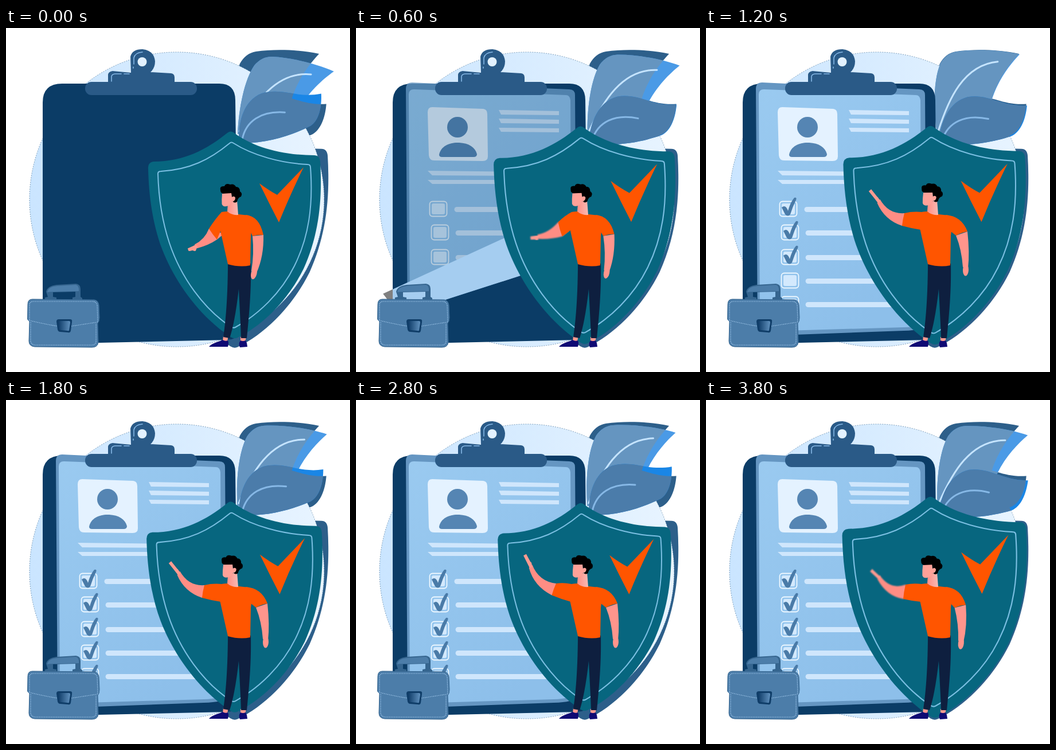
Write an HTML page that moves like this. It is 600x600 px and loops after 4 s.

```html
<!DOCTYPE html>
<html lang="en">
<head>
<meta charset="utf-8">
<title>Insurance form</title>
<style>
  html, body { margin: 0; width: 100%; height: 100%; overflow: hidden; background: #fff; }
  svg { display: block; width: 100%; height: 100%; }
</style>
</head>
<body>
<svg viewBox="0 0 600 600">
  <defs>
    <linearGradient id="sky"><stop offset="0" stop-color="#cae5ff"/><stop offset=".5" stop-color="#d8ecff"/><stop offset="1" stop-color="#e8f4ff"/></linearGradient>
    <linearGradient id="sheet" x2=".6" y2="1"><stop offset="0" stop-color="#9acaf0"/><stop offset="1" stop-color="#8dbfea"/></linearGradient>
    <linearGradient id="lock"><stop offset="0" stop-color="#123f6b"/><stop offset="1" stop-color="#5f90bd"/></linearGradient>
    <linearGradient id="neck"><stop offset="0" stop-color="#ff8f86"/><stop offset="1" stop-color="#fbb9b3"/></linearGradient>
    <circle id="disc" cx="298" cy="299" r="257"/>
    <path id="leafA" d="M403 185C396 140 396 90 408 62Q418 44 436 41C470 36 515 38 546 45C530 62 508 90 497 128C470 160 440 180 403 185Z"/>
    <path id="leafB" d="M406 196C412 165 428 130 462 124C500 121 520 146 564 147C560 170 550 192 533 198C500 206 455 212 406 200Z"/>
    <path id="shieldShape" d="M386 183Q392 178 398 183C430 207 480 222 538 222Q547 222 548 233C552 300 546 360 519 420C490 478 445 520 404 540Q398 543 392 539C340 505 295 445 272 385C255 340 249 290 248 246Q247 234 258 233C310 233 350 212 386 183Z"/>
    <path id="board" d="M64 130Q64 97 98 97H372Q400 97 400 126L405 532Q404 543 385 544L163 549H64Z"/>
    <path id="tick" d="M132 313Q139 307 143 319Q147 304 154 296Q159 295 157 300Q151 312 147 325Q143 330 138 325Z"/>
    <clipPath id="tint"><use href="#disc"/><use href="#leafA"/><use href="#leafB" transform="rotate(-5.5 410 195)"/></clipPath>
    <clipPath id="inBoard"><use href="#board"/></clipPath>
    <clipPath id="inDisc"><use href="#disc"/></clipPath>
    <clipPath id="reveal"><path id="revealShape"/></clipPath>
    <filter id="blur" x="-30%" y="-30%" width="160%" height="160%"><feGaussianBlur id="blurSize" stdDeviation="0"/></filter>
  </defs>

  <!-- shadows behind the disc -->
  <g fill="#2d5f8a">
    <use href="#leafA"/>
    <use href="#leafB" transform="rotate(-5.5 410 195)"/>
    <use href="#shieldShape" transform="translate(398 352) scale(1.087) translate(-398 -352)"/>
  </g>
  <path class="flap" id="flapOut" fill="#808080"/>
  <use href="#disc" fill="url(#sky)"/>
  <use href="#disc" fill="none" stroke="#2d5f8a" stroke-width=".6" stroke-dasharray="2 2"/>
  <path class="flap" id="flapDisc" fill="#fff" clip-path="url(#inDisc)"/>

  <!-- leaves -->
  <use class="upper" href="#leafA" fill="#4a9ae6"/>
  <g clip-path="url(#tint)"><use class="upper" href="#leafA" fill="#6595c0"/></g>
  <path class="upper" d="M405 180C422 125 448 64 508 58" fill="none" stroke="#c5e4ff" stroke-width="3" stroke-linecap="round"/>
  <use class="lower" href="#leafB" fill="#1a86e6"/>
  <g clip-path="url(#tint)"><use class="lower" href="#leafB" fill="#4b7caa"/></g>
  <path class="lower" d="M412 195C425 165 455 153 495 165" fill="none" stroke="#86b8e6" stroke-width="3" stroke-linecap="round"/>

  <!-- clipboard -->
  <use href="#board" fill="#0b3c66"/>
  <g id="doc" clip-path="url(#reveal)">
    <path fill="#6596c2" d="M87 106Q87 95 98 95L140 97L372 107Q382 107 382 117L385 518Q380 527 345 528L100 537Q90 537 90 527Z"/>
    <path fill="url(#sheet)" d="M92 116Q92 107 101 107L366 117Q373 117 374 126L376 512Q376 521 345 522L106 529Q94 530 94 520Z"/>
    <path fill="#e4f2ff" d="M125 147Q125 138 133 138L222 141Q229 142 229 150L230 224Q230 232 221 232L136 231Q128 231 127 222Z"/>
    <g fill="#5585b3"><circle cx="177" cy="173" r="18"/><path d="M145 221C148 205 165 199 180 200C197 201 208 208 211 220Q211 225 205 225H150Q145 225 145 221Z"/></g>
    <path fill="#cfe6fc" d="M249 143L354 145V152L253 151ZM249 158L354 160V167L253 166ZM249 174L354 175V182L253 181ZM125 249L300 251V258L133 257ZM125 265H300V272H133Z"/>
    <g id="rows"></g>
  </g>
  <path class="flap" id="flapBoard" clip-path="url(#inBoard)"/>
  <g fill="#2a5a87">
    <path d="M178 96V81Q179 76 186 75L218 78L217 50Q220 37 238 37Q258 39 260 58Q260 70 252 77L288 79Q294 80 294 86V96Z"/>
    <rect x="138" y="94" width="195" height="23" rx="11"/>
    <circle cx="237.500" cy="59" r="8" fill="#e2f1ff"/>
    <path d="M223 63V52Q225 43 238 42M184 93V85Q184 81 190 80H201M206 80H215M222 68V70" fill="none" stroke="#86b8e6" stroke-width="1.600" stroke-linecap="round"/>
  </g>

  <!-- briefcase -->
  <path fill="#35658f" d="M68 474V470L73 469L70 460Q72 450 88 448L122 446Q130 447 130 455V469L133 471V475H116V470L121 469V460L82 461V469L88 470V474Z"/>
  <path fill="#4c7da9" d="M72 461Q74 451 89 450L121 448Q126 448 127 455V459L84 460Q76 460 72 461Z"/>
  <path fill="#4c7da9" stroke="#35658f" d="M38 482Q38 473 46 473L154 474Q161 475 162 483L163 505Q163 512 160 515L161 548Q160 557 150 557L50 556Q40 555 40 546L41 512L37.500 508Z"/>
  <path d="M41 509V482Q42 477 48 477H152Q158 478 159 484L160 512M43 513V546Q44 553 52 553H149Q157 553 157 546V516M40 510Q75 518 90 520M114 520L160 513" fill="none" stroke="#a4cbee" stroke-width="1.100" stroke-dasharray="1.500 1.500"/>
  <path fill="#0f3d68" d="M88 512Q88 508 92 508H112Q116 508 115 513L113 528Q112 532 108 531L95 530Q91 530 90 526Z"/>
  <path fill="url(#lock)" d="M92 513Q92 511 95 511H110Q112 511 112 514L110 527Q110 529 107 528L96 527Q94 527 93 525Z"/>

  <!-- shield -->
  <g id="shield">
    <use href="#shieldShape" fill="#07667f"/>
    <path fill="none" stroke="#7bbfe2" stroke-width="2" d="M390 201Q393 198 397 201C430 222 480 236 526 238Q531 238 531 243C536 310 528 365 503 415C480 462 440 500 400 522Q396 524 392 521C345 490 305 435 285 375C270 330 266 290 265 254Q265 250 270 250C320 247 355 230 390 201Z"/>
    <path fill="#ff5500" d="M442 271Q458 283 473 291Q496 267 519 243Q495 292 476 339Q458 304 442 271Z"/>
  </g>

  <!-- man -->
  <g fill="#ff9a90"><path d="M379 537H388L386 546H378Z"/><path d="M409 539H419L417 547H409Z"/></g>
  <path fill="#0f0a73" d="M354 556C360 549 372 547 378 544Q382 547 387 545Q389 550 387 556Z"/>
  <path fill="#0f0a73" d="M408 557Q405 550 409 545Q413 547 418 545Q421 550 421 556Z"/>
  <path fill="#0e1f3f" d="M387 408L427 411C428 460 424 500 420 541H410C409 510 407 480 406 455C402 490 397 520 390 541L379 539C385 500 387 450 387 408Z"/>
  <path id="armR" fill="#ff958c"/>
  <ellipse id="handR" rx="5" ry="10.500" fill="#ff958c"/>
  <path id="forearm" fill="#ff8d84" filter="url(#blur)"/>
  <path id="hand" fill="none" stroke="#ff9a90" stroke-linecap="round" filter="url(#blur)"/>
  <path fill="#ff5500" d="M376 321L387 320L406 325L424 327L430 340L427 362L426 414Q408 418 387 412L372 345Z"/>
  <path id="sleeveL" fill="#ff5500"/>
  <path id="sleeveR" fill="#ff5500"/>
  <path fill="url(#neck)" d="M387 305L403 300L405 326Q394 327 386 320Z"/>
  <g id="head">
    <path d="M374 283Q372 275 381 276Q383 270 391 273Q398 271 401 277Q408 277 408 285Q413 288 410 294Q404 296 403 303Q399 306 396 303L393 289H379Q374 288 374 283Z"/>
    <path fill="#ffa198" d="M377 289Q376 299 376.500 307Q378 312 384 311Q391 310 394 303Q400 302 400 296Q398 292 394 295L393 288Z"/>
  </g>
</svg>
<script>
const LOOP = 4000, STEP = 200;
const $ = id => document.getElementById(id);
const set = (id, name, value) => $(id).setAttribute(name, value);
const setAll = (cls, name, value) =>
  document.querySelectorAll('.' + cls).forEach(el => el.setAttribute(name, value));

// Cosine-eased interpolation through [time, values] keys
function follow(keys, t) {
  let i = 0;
  while (i < keys.length - 2 && t >= keys[i + 1][0]) i++;
  const [t0, a] = keys[i], [t1, b] = keys[i + 1];
  const x = Math.min(1, Math.max(0, (t - t0) / (t1 - t0)));
  const e = (1 - Math.cos(Math.PI * x)) / 2;
  return a.map((v, k) => v + (b[k] - v) * e);
}

const sway = [[150, [1]], [1340, [0]], [2260, [1]], [3230, [0]], [4290, [1]]];
const pulse = [[150, [0]], [950, [1]], [1570, [0]], [2330, [1]], [2880, [0]], [3600, [1]], [4270, [0]]];

// Left arm: sleeve top, sleeve bottom, bend, wrist, fingertip
const rest = [354, 350, 368, 369, 350, 374, 331, 381, 318, 387];
const level = [351, 327, 351, 358, 327, 352, 304, 347, 291, 346];
const point = [346, 323, 342, 345, 315, 330, 301, 302, 286, 283];
const high = [351, 318, 341, 337, 314, 313, 306, 285, 299, 265];
const near = [347, 322, 342, 344, 315, 328, 303, 295, 290, 275];
const drop = [348, 322, 344, 347, 318, 337, 301, 309, 288, 297];
const arm = [[400, rest], [800, level], [1100, point], [1800, point], [2400, high], [3200, near], [3800, drop], [4000, rest]];
const lean = [[400, [0]], [800, [.45]], [1100, [1]], [3400, [1]], [3800, [.6]], [4000, [0]]];

// Page unrolling: fold height, flap size, document opacity
const unroll = [[0, [130, 0, 0]], [200, [250, .35, .25]], [400, [369, 1, .5]], [600, [500, .45, .78]], [800, [640, 0, 1]]];

const rows = [0, 41, 84, 125, 166].map((dy, i) => {
  const dx = i ? 3 : 0;
  return `<rect x="${128.5 + dx}" y="${302.5 + dy}" width="30" height="26" rx="5" fill="none" stroke="#eef8ff" stroke-width="1.800"/>
    <rect x="${132 + dx}" y="${306 + dy}" width="23" height="19" rx="3" fill="#d3e9fd"/>
    <path d="M${176 + dx * .7} ${316.5 + dy}H330" stroke="#cfe6fc" stroke-width="9" stroke-linecap="round"/>
    <use class="ticks" href="#tick" x="${dx}" y="${dy}" fill="#4a7ba8"/>`;
});
$('rows').innerHTML = rows.join('');
const ticks = [...document.querySelectorAll('.ticks')];

function drawPage(t) {
  const [y, s, alpha] = follow(unroll, t);
  const open = t >= 800;
  set('revealShape', 'd', open ? 'M0 0H600V600H0Z' : `M0 0H600V${y - 169}L75 ${y}L0 ${y + 24}Z`);
  set('doc', 'opacity', alpha);
  const flap = `M75 ${y}L${75 - 62 * s} ${y - 81 * s}L${377 - 105 * s} ${y - 97 - 154 * s}L377 ${y - 97}Z`;
  setAll('flap', 'd', open || !t ? '' : flap);
  set('flapOut', 'opacity', t < 400 ? 0 : 1);
  set('flapDisc', 'opacity', alpha);
  set('flapBoard', 'fill', t < 600 ? '#74a3cf' : '#a5cdf0');
  set('flapBoard', 'opacity', t < 400 ? .5 : 1);
  ticks.forEach((el, i) => el.setAttribute('visibility', t >= 800 + STEP * i ? 'visible' : 'hidden'));
}

function drawLeftArm(t) {
  const [ax, ay, bx, by, cx, cy, wx, wy, tx, ty] = follow(arm, t);
  const dx = wx - (ax + bx) / 2, dy = wy - (ay + by) / 2, len = Math.hypot(dx, dy);
  const nx = -dy / len, ny = dx / len;
  const side = (ax - bx) * nx + (ay - by) * ny > 0 ? 1 : -1;
  const off = (x, y, d) => `${x + nx * side * d} ${y + ny * side * d}`;
  set('forearm', 'd', `M${ax} ${ay}Q${off(cx, cy, 6)} ${off(wx, wy, 4)}L${off(wx, wy, -4)}Q${off(cx, cy, -6)} ${bx} ${by}L${bx + 12} ${by - 10}Z`);
  const mx = wx + (tx - wx) * .4, my = wy + (ty - wy) * .4;
  set('hand', 'd', `M${wx} ${wy}L${mx} ${my}M${mx} ${my}L${tx} ${ty}L${mx + 1} ${my + 1}L${wx} ${wy}L${mx + 3} ${my + 3}`);
  set('hand', 'stroke-width', 5.5);
  set('sleeveL', 'd', `M388 320L376 321Q${(376 + ax) / 2} ${(320 + ay) / 2 - 2} ${ax} ${ay}Q${(ax + bx) / 2 - 1} ${(ay + by) / 2} ${bx} ${by}Q${(bx + 374) / 2} ${(by + 352) / 2 + 1} 375 352L388 350Z`);
  const p = follow(arm, t - 60), q = follow(arm, t + 60);
  const speed = Math.hypot(q[8] - p[8], q[9] - p[9]);
  set('blurSize', 'stdDeviation', speed > 9 ? 1.2 : 0);
}

function drawRightArm(v) {
  const m = (a, b) => a + (b - a) * v;
  const outer = `${m(449, 456)} ${m(361, 355)}`, inner = `${m(430, 436)} ${m(363, 362)}`;
  set('sleeveR', 'd', `M418 326Q${m(442, 446)} 328 ${outer}Q${m(440, 447)} ${m(360, 356)} ${inner}L426 354Z`);
  set('armR', 'd', `M${inner}Q${m(433, 446)} ${m(394, 387)} ${m(428, 448)} ${m(424, 417)}L${m(437, 457)} ${m(427, 419)}Q${m(450, 460)} ${m(398, 392)} ${outer}Z`);
  set('handR', 'transform', `translate(${m(432.500, 453)} ${m(428, 422)}) rotate(${m(14, 2)})`);
  set('head', 'transform', `translate(${v} ${-v}) rotate(${2 * v} 397 318)`);
}

function draw(t) {
  const [u] = follow(pulse, t), [w] = follow(sway, t), [v] = follow(lean, t);
  setAll('upper', 'transform', `rotate(${11.4 * w} 405 190)`);
  setAll('lower', 'transform', `rotate(${-12.6 * (1 - u)} 410 195)`);
  set('shield', 'transform', `translate(398 352) scale(${1 + .087 * u}) translate(-398 -352)`);
  drawPage(t);
  drawLeftArm(t);
  drawRightArm(v);
}

const start = performance.now();
function tick() {
  const t = (performance.now() - start) % LOOP;
  draw(Math.floor(t / STEP) * STEP);
  requestAnimationFrame(tick);
}
tick();
</script>
</body>
</html>
```
